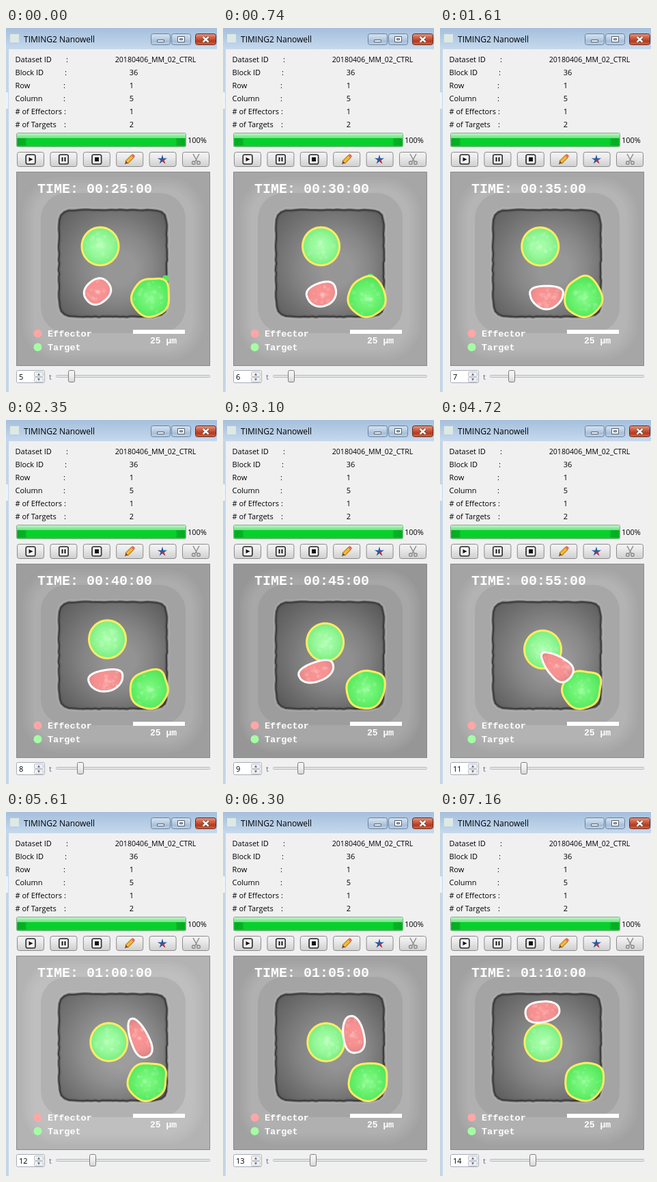
An HTML page with a canvas that plays this animation: 309 px wide and 532 px high, repeating every 8 s.

```html
<!DOCTYPE html>
<html lang="en">
<head>
<meta charset="utf-8">
<title>Nanowell viewer</title>
<style>
html, body { margin: 0; width: 100%; height: 100%; overflow: hidden; background: #f0f0f0; }
canvas { display: block; width: 309px; height: 532px; }
</style>
</head>
<body>
<canvas id="stage" width="309" height="532"></canvas>
<script>
const ctx = document.getElementById('stage').getContext('2d');
const LOOP = 8000;
const STARTS = [0, 740, 1610, 2350, 3100, 3970, 4720, 5610, 6300, 7160];
const FIRST = 5;
const UI = '"Open Sans", "Noto Sans", sans-serif';
const MONO = '"Liberation Mono", monospace';

// Key poses of the wandering effector; grey is the exposure of that image.
const pose = (step, x, y, rx, ry, angle, taper, grey) => ({ step, x, y, rx, ry, angle, taper, grey });
const POSES = [
  pose(5, 134, 385, 17, 20, 50, 0, 165),
  pose(7, 156, 394, 17, 23, 90, -0.35, 166),
  pose(9, 137, 368, 14, 26, 70, -0.15, 150),
  pose(10, 145, 388, 24, 16, 195, -0.65, 149),
  pose(12, 195, 330, 30, 13, 247, -0.25, 179),
  pose(13, 191, 325, 27, 15, 260, -0.15, 161),
  pose(14, 150, 292, 25, 15, 352, -0.1, 161)
];

function poseAt(step) {
  const next = POSES.findIndex(p => p.step >= step);
  const b = POSES[next], a = POSES[Math.max(0, next - 1)];
  const k = a === b ? 0 : (step - a.step) / (b.step - a.step);
  return Object.fromEntries(Object.keys(a).map(key => [key, a[key] + (b[key] - a[key]) * k]));
}

function randomizer(seed) {
  return () => (seed = (seed * 16807) % 2147483647) / 2147483647;
}

function vertical(y0, y1, ...colors) {
  const g = ctx.createLinearGradient(0, y0, 0, y1);
  colors.forEach((c, i) => g.addColorStop(i / (colors.length - 1), c));
  return g;
}

function box(x, y, w, h, fill, stroke, r = 0) {
  ctx.beginPath();
  ctx.roundRect(x, y, w, h, r);
  if (fill) { ctx.fillStyle = fill; ctx.fill(); }
  if (stroke) { ctx.strokeStyle = stroke; ctx.lineWidth = 1; ctx.stroke(); }
}

function text(str, x, y, font, color = '#000', align = 'left') {
  ctx.font = font;
  ctx.fillStyle = color;
  ctx.textAlign = align;
  ctx.fillText(str, x, y);
}

function strokePath(path, color, width) {
  ctx.strokeStyle = color;
  ctx.lineWidth = width;
  ctx.stroke(path);
}

function disc(x, y, r, color) {
  ctx.beginPath();
  ctx.arc(x, y, r, 0, 7);
  ctx.fillStyle = color;
  ctx.fill();
}

// Closed path through point(angle) for one full turn.
function around(point, count = 72) {
  const path = new Path2D();
  for (let i = 0; i < count; i++) path.lineTo(...point(i / count * 2 * Math.PI));
  path.closePath();
  return path;
}

function arrow(x, y, dx, dy, color) {
  ctx.beginPath();
  ctx.moveTo(x + dx, y + dy);
  ctx.lineTo(x - dx - dy, y - dy + dx);
  ctx.lineTo(x - dx + dy, y - dy - dx);
  ctx.fillStyle = color;
  ctx.fill();
}

function drawWindow() {
  box(0, 0, 309, 532, '#c3d6e9');
  box(0, 0, 309, 31, vertical(0, 31, '#a5bfdc', '#b5cce5', '#c6d9ed'));
  box(0, 94, 3, 24, '#edf3f9');
  box(4, 31, 305, 501, '#f0f0f0');
  box(6, 9, 13, 12, '#dfe9e4');
  text('TIMING2 Nanowell', 26, 21, '12px ' + UI);
  const glass = vertical(8, 25, '#d5e3f1', '#c3d5e8', '#a6bfd9', '#bfd3e8');
  const red = vertical(8, 25, '#e5a28e', '#cf6449', '#b9381c', '#d3714b');
  box(212.5, 8.5, 28, 16, glass, '#6c819a', 3);
  box(242.5, 8.5, 28, 16, glass, '#6c819a', 3);
  box(277.5, 8.5, 30, 16, red, '#5e2a25', 3);
  box(221.5, 17.5, 10, 3, '#fff', '#53606e');
  box(251.5, 12.5, 10, 8, '#fff', '#53606e');
  box(254.5, 15.5, 4, 2, '#b3c8de', '#53606e');
  const cross = new Path2D('M288.5 13l8 7.5m0-7.5l-8 7.5');
  strokePath(cross, '#543', 4);
  strokePath(cross, '#fff', 2.4);
}

function drawInfo() {
  const font = '11px ' + UI;
  const rows = [
    ['Dataset ID', 88, '20180406_MM_02_CTRL', 219], ['Block ID', 86, '36', 187],
    ['Row', 84, '1', 184], ['Column', 84, '5', 184],
    ['# of Effectors', 85, '1', 184], ['# of Targets', 85, '2', 184]
  ];
  rows.forEach(([label, colon, value, x], i) => {
    const y = 50 + i * 19;
    text(label, 13.5, y, font);
    text(':', colon, y, font);
    text(value, x, y, i ? font : '10.6px ' + UI, '#000', 'center');
  });
  box(15.5, 153.5, 248, 20, '#06d12a', '#8fa892', 2);
  const ends = ctx.createLinearGradient(16, 0, 263, 0);
  [[0, 0.4], [0.05, 0.3], [0.06, 0], [0.94, 0], [0.95, 0.3], [1, 0.4]]
    .forEach(([at, alpha]) => ends.addColorStop(at, `rgba(0,110,20,${alpha})`));
  box(17, 161, 245, 11, ends);
  box(16, 154, 247, 7, vertical(154, 161, 'rgba(255,255,255,.75)', 'rgba(255,255,255,.4)'));
  text('100%', 266, 168, font);
}

function drawButtons() {
  for (let i = 0; i < 6; i++) {
    box(16.5 + i * 48.4, 181.5, 39, 21, vertical(181, 203, '#f4f4f4', '#ececec', '#dcdcdc', '#cfcfcf'), '#8a8a8a', 3);
  }
  for (let i = 0; i < 3; i++) {
    box(29.3 + i * 48.4, 185.2, 13.5, 13.5, '#f5f5f5', '#333', 2);
    ctx.lineWidth = 1.6;
    ctx.stroke();
  }
  arrow(36.5, 192, 3, 0, '#111');
  box(81.5, 189, 2, 6, '#111');
  box(85.5, 189, 2, 6, '#111');
  box(130, 189, 6, 6, '#111');

  ctx.save();
  ctx.translate(174, 199);
  ctx.rotate(-Math.PI / 4);
  box(4, -2.5, 12, 5, '#f7b733', '#b57a20');
  box(16, -2.5, 3, 5, '#e06e62');
  arrow(2, 0, -2.2, 0, '#6b4a26');
  ctx.restore();

  const star = around(a => {
    const r = Math.round(a / Math.PI * 5) % 2 ? 2.6 : 7.5;
    return [229 + r * Math.sin(a), 192.5 - r * Math.cos(a)];
  }, 10);
  ctx.fillStyle = '#27549f';
  ctx.fill(star);
  ctx.save();
  ctx.beginPath();
  ctx.rect(229, 192, 10, 10);
  ctx.clip();
  ctx.fillStyle = '#c8303b';
  ctx.fill(star);
  ctx.restore();

  strokePath(new Path2D('M274 184l6 11m3-11l-6 11'), '#8a8a8a', 1.4);
  for (const x of [274.8, 282]) {
    ctx.beginPath();
    ctx.arc(x, 197, 2.3, 0, 7);
    ctx.stroke();
  }
}

function drawWell(grey) {
  box(15, 210, 284, 284, `rgb(${grey},${grey},${grey})`);
  for (let i = 0; i < 5; i++) {
    box(24 + i * 4, 218 + i * 4, 266 - i * 8, 268 - i * 8, 'rgba(255,255,255,.035)', null, 54 - i * 3);
  }
  box(51, 241, 212, 205, 'rgba(90,90,90,.14)', null, 38);

  // Slightly ragged rounded square.
  const rand = randomizer(77);
  const well = around(a => {
    const c = Math.cos(a), s = Math.sin(a);
    const r = (c ** 10 + s ** 10) ** -0.1 + rand() * 0.016 - 0.008;
    return [156.5 + c * r * 79, 344 + s * r * 78];
  }, 100);
  strokePath(well, 'rgba(205,205,205,.3)', 8);
  const g = ctx.createRadialGradient(168, 352, 22, 154, 342, 108);
  [70, 55, 33, 12].forEach((lift, i) => {
    const v = Math.round((grey - 5) * 0.5 + lift);
    g.addColorStop(i / 3, `rgb(${v},${v},${v})`);
  });
  ctx.fillStyle = g;
  ctx.fill(well);
  strokePath(well, 'rgba(70,70,70,.4)', 5);
  strokePath(well, '#3a3a3a', 2);
}

function drawCell(path, x, y, radius, colors, line, seed) {
  const g = ctx.createRadialGradient(x, y, 3, x, y, radius);
  colors.forEach((c, i) => g.addColorStop(i / (colors.length - 1), c));
  ctx.fillStyle = g;
  ctx.fill(path);
  ctx.save();
  ctx.clip(path);
  const rand = randomizer(seed);
  for (let i = 0; i < 26; i++) {
    const a = rand() * 6.28, r = rand() * radius * 0.75;
    disc(x + Math.cos(a) * r, y + Math.sin(a) * r, 1 + rand() * 2.5, 'rgba(255,255,255,.11)');
  }
  ctx.restore();
  ctx.lineJoin = 'round';
  strokePath(path, line, 3);
}

function drawMidTarget(step) {
  const x = 151 - 13 * Math.exp((FIRST - step) / 1.8);
  const y = 319 + 17.5 / (1 + Math.exp((9.4 - step) * 1.7));
  const path = around(a => [x + 27 * Math.cos(a), y + 27.7 * Math.sin(a)]);
  drawCell(path, x, y, 29, ['#a6ffa9', '#95f799', '#76ed7c'], '#ffec62', 31 + step);
}

// Drifts left and springs back; a bud swings over the top and is absorbed.
function drawCornerTarget(step) {
  const age = step - FIRST;
  const x = 211.5 - 0.8 * (age % 8), y = 394.5;
  const lean = -0.65 - 0.9 * Math.exp(-((step - 6.6) ** 2) / 2);
  const bud = 36 - age * 5;
  disc(x + bud * Math.cos(lean + 0.0), y + bud * Math.sin(lean), 5, '#55e660');
  const path = around(a => {
    const off = Math.atan2(Math.sin(a - lean), Math.cos(a - lean));
    const r = 27.5 + 5.5 * Math.exp(-((off / 0.42) ** 2)) + 0.6 * Math.sin(a * 5 + step);
    return [x + r * Math.cos(a), y + r * Math.sin(a)];
  });
  drawCell(path, x, y, 33, ['#80fa84', '#66f06c', '#4ce456'], '#ffec62', 91 + step);
}

function drawEffector({ x, y, rx, ry, angle, taper, step }) {
  const turn = angle * Math.PI / 180;
  const soften = v => Math.sign(v) * Math.abs(v) ** 0.85;
  const path = around(a => {
    const u = rx * soften(Math.cos(a));
    const v = ry * soften(Math.sin(a)) * (1 + taper * Math.cos(a));
    return [x + u * Math.cos(turn) - v * Math.sin(turn), y + u * Math.sin(turn) + v * Math.cos(turn)];
  });
  drawCell(path, x, y, 30, ['#fa9494', '#f49090', '#d98383'], '#fff', 11 + step);
}

function drawOverlay(step) {
  const minutes = step * 5;
  const pad = n => String(n).padStart(2, '0');
  const small = 'bold 13.5px ' + MONO;
  text(`TIME: ${pad(Math.floor(minutes / 60))}:${pad(minutes % 60)}:00`, 46, 241, 'bold 20px ' + MONO, '#fff');
  disc(46.5, 446.5, 6, '#ffa6a6');
  disc(46.5, 466.5, 6, '#a4ffa4');
  text('Effector', 61, 451, small, '#fff');
  text('Target', 61, 471, small, '#fff');
  box(186, 441, 76, 6, '#fff');
  text('25 μm', 211, 461, 'bold 13px ' + MONO, '#fff');
}

function drawSlider(step) {
  box(15.5, 500.5, 41, 18, '#fff', '#a6adb8', 2);
  text(String(step), 19, 514, '11px ' + UI);
  for (const y of [502.5, 510.5]) box(41.5, y, 13, 7, '#eee', '#c2c2c2', 1);
  arrow(48, 506, 0, -1.8, '#4b62a0');
  arrow(48, 514, 0, 1.8, '#4b62a0');
  text('t', 63, 514, '11px ' + UI, '#666a94');
  box(73.5, 507.5, 225, 3, '#e5e7e8', '#b5b8bc', 1);
  const x = Math.round(96 + (step - FIRST) * 4.45);
  box(x - 4.5, 500.5, 9, 17, vertical(500, 518, '#f7f7f7', '#ededed', '#d4d4d4'), '#7d7d7d', 2);
}

function draw(step) {
  const effector = poseAt(step);
  drawWindow();
  drawInfo();
  drawButtons();
  ctx.save();
  ctx.beginPath();
  ctx.rect(15, 210, 284, 284);
  ctx.clip();
  drawWell(effector.grey);
  drawMidTarget(step);
  drawCornerTarget(step);
  drawEffector(effector);
  drawOverlay(step);
  ctx.restore();
  box(15.5, 210.5, 283, 283, null, '#8a8a8a');
  drawSlider(step);
}

let shown = -1;
function tick() {
  const t = performance.now() % LOOP;
  const step = FIRST + STARTS.filter(s => s <= t).length - 1;
  if (step !== shown) draw(shown = step);
  requestAnimationFrame(tick);
}
tick();
</script>
</body>
</html>
```
